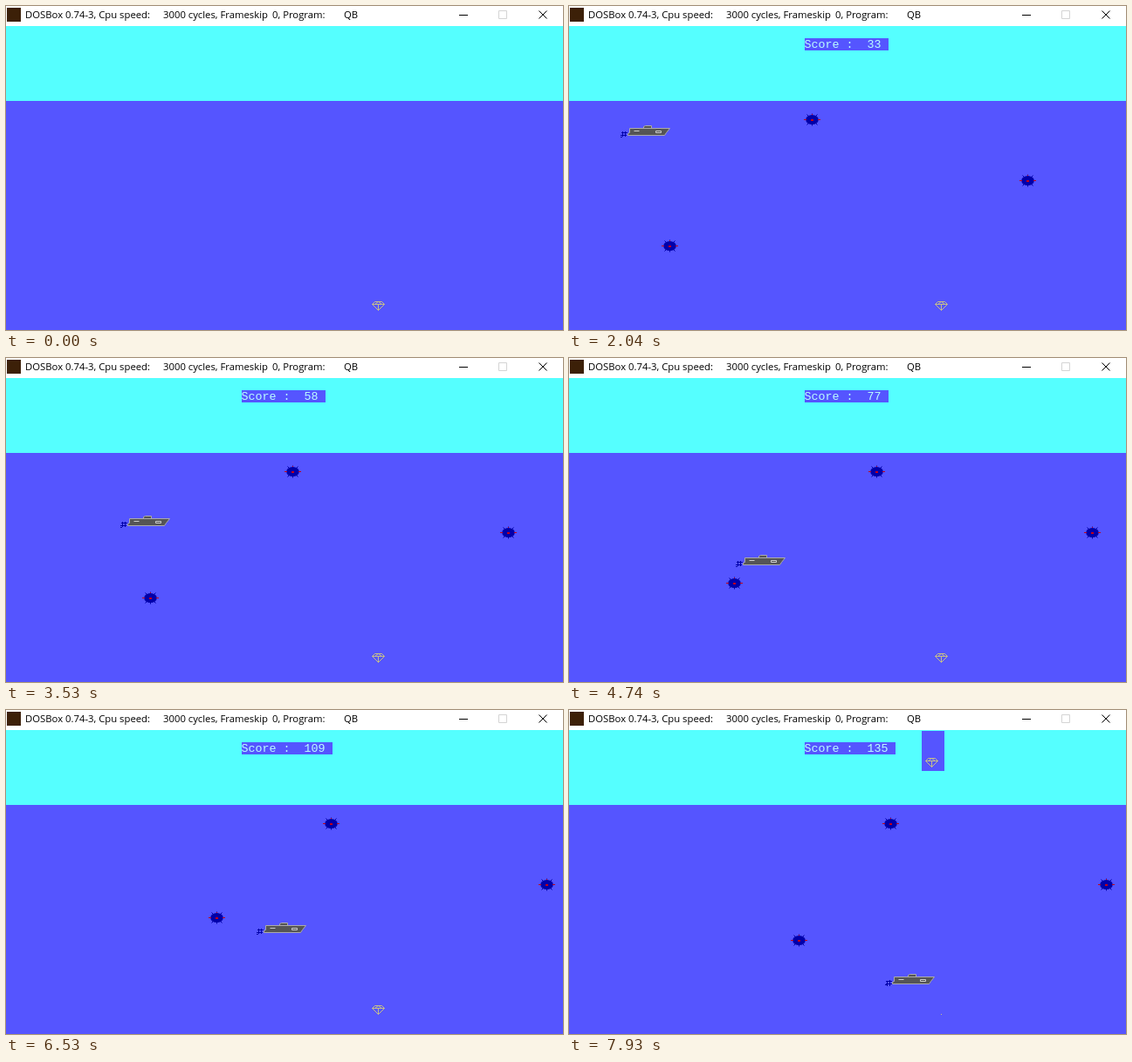
Animation, 638 px wide and 372 px high, one loop 8 s. Source, as an HTML page with a canvas:

```html
<!DOCTYPE html>
<html lang="en">
<head>
<meta charset="utf-8">
<title>Submarine game</title>
<style>
html, body { margin: 0; width: 100%; height: 100%; overflow: hidden; background: #55f; }
canvas { display: block; }
</style>
</head>
<body>
<canvas id="stage" width="638" height="372"></canvas>
<script>
const ctx = document.getElementById('stage').getContext('2d');
const LOOP = 8, START = 0.08, GEM_SCORE = 133;
const SKY = '#5ff', SEA = '#55f', NAVY = '#0000aa', RED = '#c00018', GEM = '#c4bc8c';

// Counts up from 0 while n runs between two ticks.
const ramp = (n, from, to = Infinity) => Math.min(Math.max(n - from, 0), to - from);

function rect(x, y, w, h, color) {
  ctx.fillStyle = color;
  ctx.fillRect(x, y, w, h);
}

function path(points, stroke, fill) {
  ctx.beginPath();
  points.forEach(([x, y]) => ctx.lineTo(x + 0.5, y + 0.5));
  if (fill) {
    ctx.closePath();
    ctx.fillStyle = fill;
    ctx.fill();
  }
  ctx.strokeStyle = stroke;
  ctx.stroke();
}

function at(x, y, draw) {
  ctx.save();
  ctx.translate(Math.round(x), Math.round(y));
  draw();
  ctx.restore();
}

function text(str, x, y, font, color) {
  ctx.font = font;
  ctx.fillStyle = color;
  ctx.fillText(str, x, y);
}

function titleBar() {
  rect(0, 0, 638, 23, '#fff');
  rect(1, 2, 16, 16, '#3c2008');
  const font = '11.3px "Open Sans", sans-serif';
  text('DOSBox 0.74-3, Cpu speed:', 22, 14, font, '#000');
  text('3000 cycles, Frameskip', 180, 14, font, '#000');
  text('0, Program:', 305, 14, font, '#000');
  text('QB', 387, 14, font, '#000');
  rect(519, 10, 10, 1, '#000');
  path([[564, 5], [573, 5], [573, 14], [564, 14]], '#d4d4d4', '#fff');
  path([[610, 5], [619, 14]], '#000');
  path([[619, 5], [610, 14]], '#000');
}

function scoreBoard(score) {
  const str = `Score :  ${score} `;
  rect(270, 37, str.length * 8, 14, SEA);
  text(str, 269.5, 48, '13.33px "Liberation Mono", monospace', '#bff');
}

function gem(x, y) {
  at(x, y, () => {
    path([[-4, -5], [4, -5], [7, -2], [0, 5], [-7, -2], [-4, -5]], GEM);
    path([[-7, -2], [7, -2]], GEM);
    path([[-4, -2], [0, -5], [4, -2]], GEM);
    path([[0, -2], [0, 5]], GEM);
  });
}

function mine(x, y) {
  at(x, y, () => {
    for (const side of [-1, 1]) {
      path([[-6, side * 6], [6, -side * 6]], NAVY);
    }
    path([[0, -7], [0, 7]], NAVY);
    ctx.beginPath();
    ctx.ellipse(0.5, 0.5, 7.3, 5.5, 0, 0, Math.PI * 2);
    ctx.fillStyle = NAVY;
    ctx.fill();
    rect(-9, 0, 3, 1, RED);
    rect(7, 0, 3, 1, RED);
    rect(-1, 0, 3, 2, RED);
    rect(0, -6, 1, 1, RED);
  });
}

function submarine(x, y, spin) {
  at(x, y, () => {
    path([[17, 0], [17, -2], [19, -3], [26, -3], [26, 0]], '#aaa', '#555');
    path([[1, 0], [47, 0], [43, 5], [41, 8], [-1, 8], [-1, 6], [1, 5]], '#aaa', '#555');
    path([[6, 3], [12, 3]], '#ccc');
    path([[31, 3], [37, 3], [37, 5], [31, 5], [31, 3]], '#ccc');
    // Propeller
    rect(-8, 5, 7, 1, NAVY);
    rect(-9 + spin, 8, 7, 1, NAVY);
    rect(-7, 4 + spin, 1, 6, NAVY);
    rect(-4, 4, 1, 6 + spin, NAVY);
    rect(-9, 10 - spin, 2, 1, NAVY);
  });
}

function draw(t) {
  // The game speeds up a little later on; the submarine moves mid-tick.
  const clock = 0.8 + 16.25 * t + 1.7 * ramp(t, 4.74);
  const score = Math.floor(clock), subTick = Math.floor(clock + 0.55);

  rect(0, 23, 638, 86, SKY);
  rect(0, 109, 638, 263, SEA);
  titleBar();

  if (score < GEM_SCORE) {
    gem(426, 344);
  } else {
    rect(404, 24, 26, 46, SEA);
    gem(415, 60);
    rect(426, 349, 1, 1, GEM);
  }
  if (t < START) return;

  scoreBoard(score);

  // All mines drift together; the lowest one also chases the submarine.
  const driftX = 459 + Math.min(2 * score, 63 + score, 160) - ramp(score, 115) / 5;
  mine(driftX - 247, 130);
  mine(driftX, 200);
  mine(driftX - 410 + ramp(score, 77), 275 - ramp(score, 60, 103) + ramp(score, 103));

  const dive = ramp(subTick, 43, 73) + ramp(subTick, 103, 109) + ramp(subTick, 113, 133);
  submarine(23 + 3 * ramp(subTick, 19), 140 + 2.96 * dive, subTick % 2);
}

function tick() {
  draw(performance.now() / 1000 % LOOP);
  requestAnimationFrame(tick);
}
tick();
</script>
</body>
</html>
```
